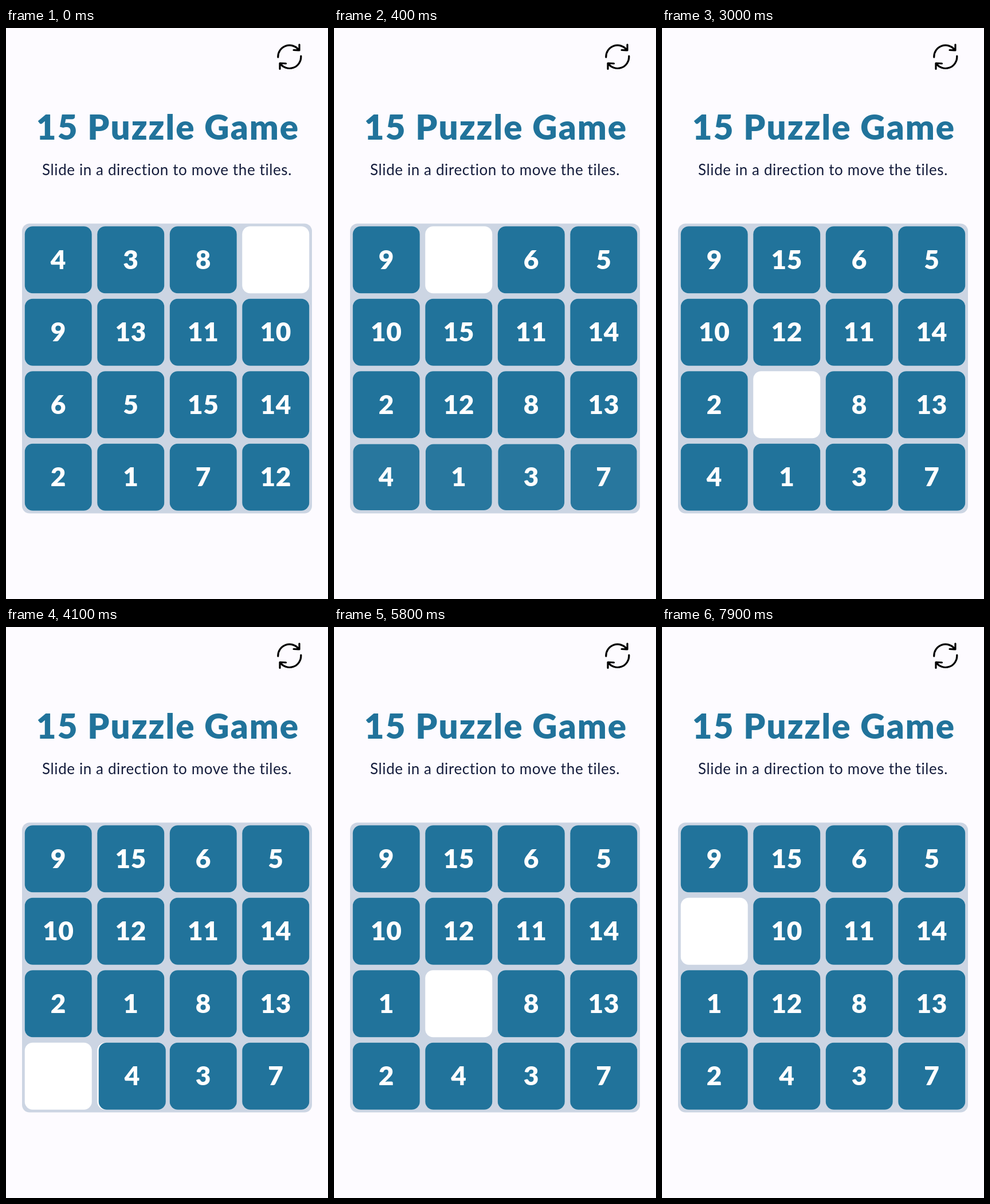
These frames come from a looping animation (562x997 px, 8000 ms). An HTML page:

```html
<!DOCTYPE html>
<html lang="en">
<head>
<meta charset="utf-8">
<title>15 Puzzle Game</title>
<style>
html, body { margin: 0; width: 100%; height: 100%; overflow: hidden; background: #fdfbff; }
svg { display: block; width: 100%; height: 100%; }
text { font-family: Lato, sans-serif; text-anchor: middle; }
.title { font-size: 60px; font-weight: 900; fill: #21739b; letter-spacing: 2px; }
.hint { font-size: 26px; fill: #141c3c; letter-spacing: .6px; }
.icon { fill: none; stroke: #000; stroke-width: 3.2; stroke-linecap: round; stroke-linejoin: round; }
.slot { fill: #fff; }
.tile rect { fill: #21739b; }
.tile text { font-size: 46px; font-weight: 900; fill: #fff; letter-spacing: .5px; }
</style>
</head>
<body>
<svg viewBox="0 0 562 997">
  <g class="icon">
    <path d="M474.8 51A20 20 0 0 1 511 38.5M512 29V39L502 38.5"/>
    <path d="M514.8 49A20 20 0 0 1 478.5 62M478 71.500V61.500L488.500 62"/>
  </g>
  <text class="title" x="282.500" y="195">15 Puzzle Game</text>
  <text class="hint" x="281" y="257">Slide in a direction to move the tiles.</text>
  <rect x="28" y="341.500" width="506" height="506" rx="13" fill="#ccd5e3"/>
  <g id="board"></g>
</svg>
<script>
const LOOP = 8000, STEP = 100, PITCH = 126.5, SIZE = 117;
const BEFORE = [4, 3, 8, 0, 9, 13, 11, 10, 6, 5, 15, 14, 2, 1, 7, 12];
const AFTER = [9, 0, 6, 5, 10, 15, 11, 14, 2, 12, 8, 13, 4, 1, 3, 7];
const SHUFFLE = 25, FADE = 300, STAGGER = 44;
// start time, tile number, columns, rows
const MOVES = [
  [1950, 15, 0, -1], [2500, 12, 0, -1], [3200, 1, 0, -1], [3800, 4, 1, 0],
  [4450, 2, 0, 1], [5100, 1, -1, 0], [6050, 12, 0, 1], [6950, 10, 1, 0]
];

const board = document.getElementById('board');

function add(parent, name, attrs = {}) {
  const el = document.createElementNS('http://www.w3.org/2000/svg', name);
  for (const key in attrs) el.setAttribute(key, attrs[key]);
  return parent.appendChild(el);
}

const square = { x: -SIZE / 2, y: -SIZE / 2, width: SIZE, height: SIZE, rx: 14 };
const slots = AFTER.map(() => add(board, 'rect', { ...square, class: 'slot' }));
const tiles = AFTER.map((_, n) => {
  if (!n) return null;
  const g = add(board, 'g', { class: 'tile' });
  add(g, 'rect', square);
  add(g, 'text', { y: 16 }).textContent = n;
  return g;
});

function place(el, col, row, shown) {
  const x = 28 + PITCH * (col + .5), y = 341.5 + PITCH * (row + .5);
  el.setAttribute('transform', `translate(${x} ${y}) scale(${.7 + .3 * shown})`);
  el.setAttribute('opacity', shown);
}

// Underdamped spring that peaks about 2% past its goal after 300 ms
function spring(t) {
  if (t <= 0) return 0;
  const w = Math.PI / 300, d = .01305;
  return 1 - Math.exp(-d * t) * (Math.cos(w * t) + d / w * Math.sin(w * t));
}

function reveal(t, row) {
  const p = Math.min(1, Math.max(0, (t - SHUFFLE - row * STAGGER) / FADE));
  return 1 - (1 - p) ** 2;
}

function draw(t) {
  const shuffled = t >= SHUFFLE;
  (shuffled ? AFTER : BEFORE).forEach((n, i) => {
    let col = i % 4, row = i >> 2;
    const shown = shuffled ? reveal(t, row) : 1;
    place(slots[i], col, row, shown);
    if (!n) return;
    for (const [start, tile, dx, dy] of MOVES) {
      if (tile !== n) continue;
      const s = spring(t - start);
      col += dx * s;
      row += dy * s;
    }
    place(tiles[n], col, row, shown);
  });
}

let origin;
function frame(now) {
  origin ??= now;
  const t = (now - origin) % LOOP;
  draw(Math.floor(t / STEP) * STEP);
  requestAnimationFrame(frame);
}
draw(0);
requestAnimationFrame(frame);
</script>
</body>
</html>
```
